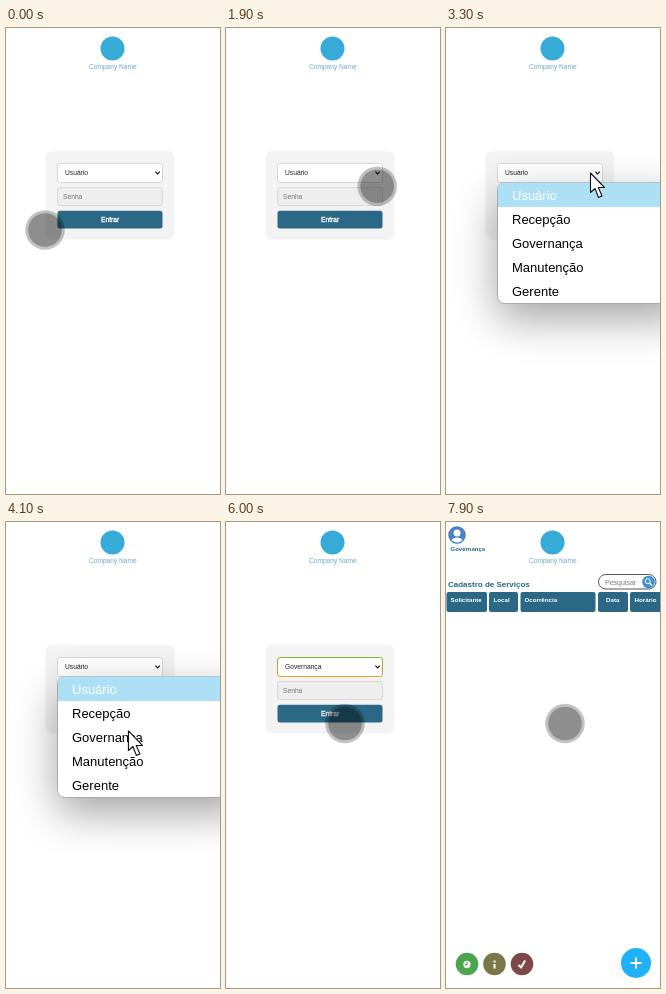
Write an HTML page that moves like this. It is 214x466 px and loops after 8 s.

```html
<!DOCTYPE html>
<html lang="pt">
<head>
<meta charset="utf-8">
<title>Login</title>
<style>
html, body { margin: 0; width: 100%; height: 100%; overflow: hidden; background: #fff; }
svg { display: block; width: 100vw; height: 100vh; font-family: "Liberation Sans", Arial, sans-serif; }
.small { font-size: 6.7px; }
.bold { font-weight: bold; }
.teal { fill: #1f6685; }
</style>
</head>
<body>
<svg viewBox="0 0 214 466" xmlns="http://www.w3.org/2000/svg">
  <defs>
    <linearGradient id="ring" x1="0" y1="0" x2="0" y2="1">
      <stop offset="0" stop-color="#82b636"/><stop offset="1" stop-color="#f09a35"/>
    </linearGradient>
    <filter id="soft" x="-30%" y="-30%" width="160%" height="160%"><feGaussianBlur stdDeviation="1"/></filter>
    <filter id="shadow" x="-60%" y="-80%" width="220%" height="260%"><feGaussianBlur stdDeviation="22"/></filter>
    <clipPath id="face"><circle cx="11" cy="13" r="7.5"/></clipPath>
  </defs>
  <rect width="214" height="466" fill="#fff"/>

  <circle cx="106.5" cy="20.5" r="12" fill="#36abd8"/>
  <text x="83" y="41" font-size="6.6" fill="#70a9c4">Company Name</text>

  <g id="login">
    <rect x="40" y="123.500" width="128" height="87.500" rx="6" fill="#eee" filter="url(#soft)"/>
    <rect x="40.500" y="124" width="127" height="86.500" rx="5" fill="#f3f3f3"/>
    <rect id="select" x="51.500" y="135.500" width="105" height="19" rx="2.500" fill="#fff"/>
    <text id="role" class="small" x="59" y="147.300" fill="#222"></text>
    <path d="M149.400 143.600l2.200 2.200 2.200-2.200" fill="none" stroke="#111" stroke-width="1.200"/>
    <rect x="51.500" y="159.500" width="105" height="18" rx="2.500" fill="#eee" stroke="#d2d2d2" stroke-width=".8"/>
    <text class="small" x="57" y="171.200" fill="#777">Senha</text>
    <rect x="51.500" y="182.800" width="105" height="17.600" rx="2.500" fill="#2a6885"/>
    <text class="small" x="95" y="194" fill="#fff" stroke="#fff" stroke-width=".3">Entrar</text>
  </g>

  <g id="menu">
    <rect x="51" y="170" width="190" height="121" rx="8" filter="url(#shadow)" opacity=".36"/>
    <rect x="51.500" y="154.500" width="190" height="121" rx="7" fill="#fff" stroke="#aaa"/>
    <path d="M52 179V161a6.500 6.500 0 0 1 6.500-6.500H214V179Z" fill="#addff5"/>
  </g>

  <g id="services">
    <circle cx="11" cy="13" r="8" fill="#fff" stroke="#3f78bd" stroke-width="1.500"/>
    <g clip-path="url(#face)">
      <rect x="2" y="4" width="18" height="18" fill="#4682c6"/>
      <circle cx="11" cy="11" r="3.500" fill="#fff"/>
      <ellipse cx="11" cy="20" rx="6" ry="4.500" fill="#fff"/>
    </g>
    <text class="bold teal" x="4.500" y="29" font-size="6">Governança</text>
    <text class="bold teal" x="2" y="65" font-size="8">Cadastro de Serviços</text>
    <rect x="152.500" y="52.500" width="57.500" height="14.500" rx="7.250" fill="#fff" stroke="#555"/>
    <text x="159" y="63" font-size="7" fill="#777">Pesquisar</text>
    <circle cx="202.500" cy="60" r="6.300" fill="#3f91cf"/>
    <circle cx="201.800" cy="59.200" r="2.500" fill="none" stroke="#fff"/>
    <path d="M203.700 61.200l2.300 2.400" stroke="#fff" stroke-width="1.300"/>
    <g id="columns"></g>
    <circle cx="21" cy="442" r="11.300" fill="#4da44f"/>
    <circle cx="21" cy="442.500" r="3.700" fill="#e9f1e5"/>
    <path d="M21 440v2.700h-2" fill="none" stroke="#4b7d4b" stroke-width=".8"/>
    <circle cx="48.500" cy="442" r="11.300" fill="#7a7848"/>
    <path d="M48.500 438.500v2M48.500 442v4.500" stroke="#fff" stroke-width="2"/>
    <circle cx="76" cy="442" r="11.300" fill="#7d4848"/>
    <path d="M72.500 443l2.600 2.500 4-7" fill="none" stroke="#fff" stroke-width="2"/>
    <circle cx="190" cy="441" r="15" fill="#20b1fb"/>
    <path d="M184.500 441h11M190 435.500v11" stroke="#fff" stroke-width="2"/>
  </g>

  <g id="touch">
    <circle r="19.800" opacity=".24"/>
    <circle r="16.800" opacity=".27"/>
  </g>
  <path id="arrow" d="M0 0V19.500L4.500 15.500 8 24.500 11.500 23 7.800 14.500H14Z" fill="#fff" stroke="#111" stroke-width="1.100" stroke-linejoin="round"/>
</svg>
<script>
const LOOP = 8000, OPEN = 3000, CLOSE = 4800, ENTER = 7000;
const $ = id => document.getElementById(id);

function add(parent, tag, attrs, text = "") {
  const node = document.createElementNS("http://www.w3.org/2000/svg", tag);
  for (const key in attrs) node.setAttribute(key, attrs[key]);
  node.textContent = text;
  parent.append(node);
}

["Usuário", "Recepção", "Governança", "Manutenção", "Gerente"].forEach((name, i) =>
  add($("menu"), "text", { x: 66, y: 172 + 24 * i, "font-size": 13, fill: i ? "#000" : "#fff" }, name));

// left edge, width, label inset, label
[[.5, 40.5, 4, "Solicitante"], [43, 29, 4.5, "Local"], [74.5, 75, 4, "Ocorrência"],
 [152, 30, 8, "Data"], [184, 34, 4.5, "Horário"]].forEach(([x, width, inset, label]) => {
  add($("columns"), "rect", { x, y: 70, width, height: 20, rx: 2, fill: "#2a6885" });
  add($("columns"), "text", { x: x + inset, y: 80.3, "font-size": 6.2, class: "bold", fill: "#fff" }, label);
});

// Pointer moves: start, end, destination
const START = [39, 202];
const MOVES = [
  [300, 1200, [150, 161]],
  [1500, 2400, [153, 154]],
  [3400, 4300, [128.5, 225]],
  [5200, 5700, [119, 201.5]]
];
const ARROWS = [[OPEN, 5300], [ENTER, 7300]];

const ease = p => p < .5 ? 2 * p * p : 1 - 2 * (1 - p) ** 2;

function pointer(t) {
  let from = START;
  for (const [begin, end, to] of MOVES) {
    if (t < begin) break;
    const p = ease(Math.min(1, (t - begin) / (end - begin)));
    from = from.map((v, i) => v + (to[i] - v) * p);
  }
  return from;
}

const show = (id, on) => $(id).setAttribute("display", on ? "inline" : "none");

function draw(t) {
  const chosen = t >= CLOSE;
  show("login", t < ENTER);
  show("services", t >= ENTER);
  show("menu", t >= OPEN && t < CLOSE);
  $("role").textContent = chosen ? "Governança" : "Usuário";
  $("select").setAttribute("stroke", chosen ? "url(#ring)" : "#d0d0d0");
  $("select").setAttribute("stroke-width", chosen ? 1 : .8);

  const [x, y] = pointer(t);
  const arrow = ARROWS.some(([a, b]) => t >= a && t < b);
  show("arrow", arrow);
  show("touch", !arrow);
  $("touch").setAttribute("transform", `translate(${x} ${y})`);
  $("arrow").setAttribute("transform", `translate(${x - 8.5} ${y - 9})`);
}

const began = performance.now();
function tick() {
  draw(Math.floor((performance.now() - began) % LOOP / 100) * 100);
  requestAnimationFrame(tick);
}
tick();
</script>
</body>
</html>
```
